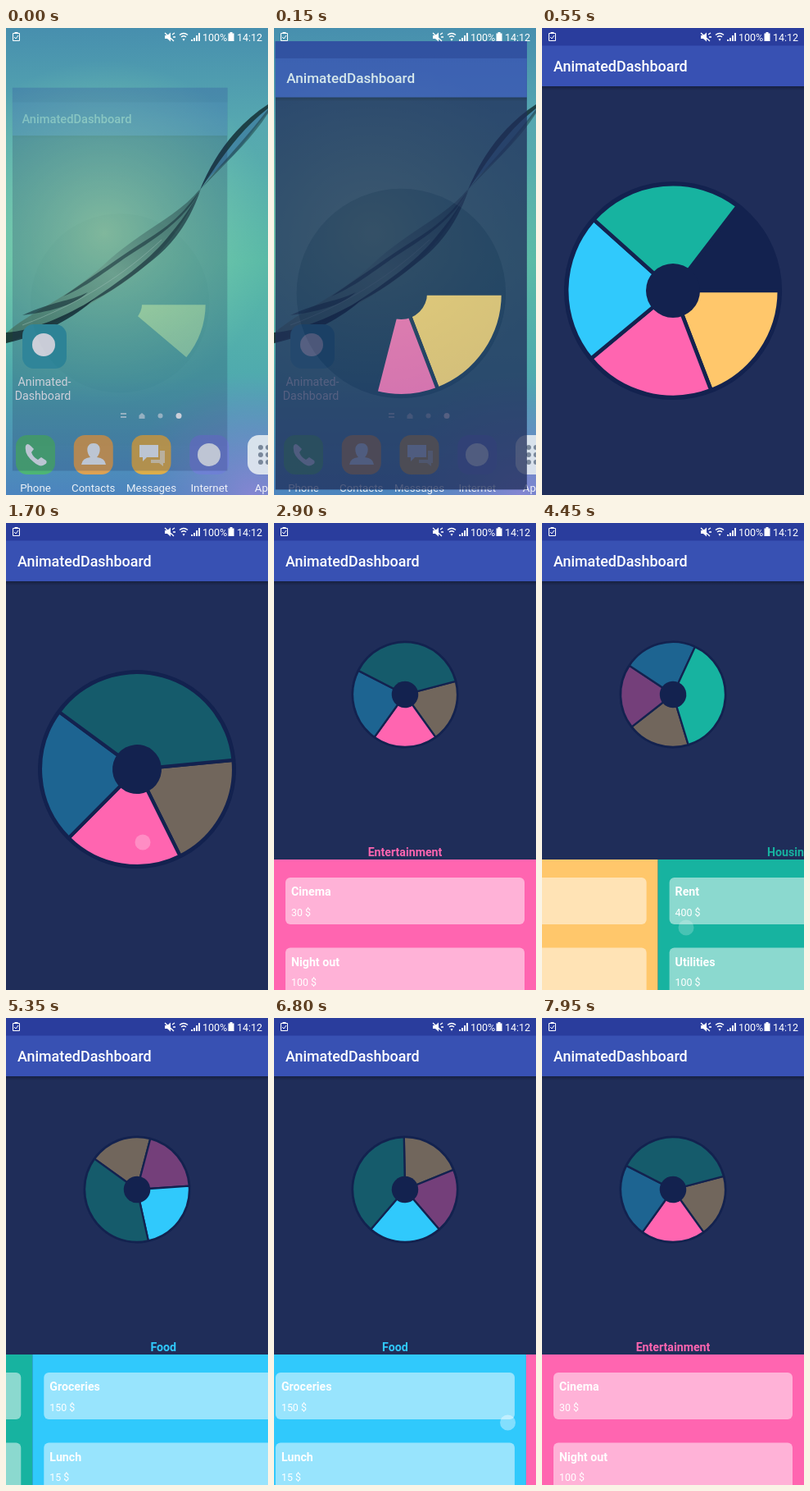
An HTML page that plays this animation: 320 by 569 pixels, repeating every 8000 ms.

```html
<!DOCTYPE html>
<html lang="en">
<head>
<meta charset="utf-8">
<title>AnimatedDashboard</title>
<style>
html, body { margin: 0; width: 100%; height: 100%; overflow: hidden; background: #1f2d59; }
svg { display: block; width: 100vw; height: 100vh; font-family: Roboto, "Noto Sans", sans-serif; fill: #fff; }
.status { font-size: 12.5px; }
.bar { font-size: 17.9px; font-weight: 500; }
.title { font-size: 14.2px; font-weight: 700; text-anchor: middle; }
.item { font-size: 14.2px; font-weight: 700; }
.amount { font-size: 12.4px; }
.app { font-size: 14.2px; text-anchor: middle; }
.dock { font-size: 13.3px; text-anchor: middle; }
</style>
</head>
<body>
<svg viewBox="0 0 320 569">
  <defs>
    <linearGradient id="sky" x1="0" y1="0" x2="0" y2="1">
      <stop offset="0" stop-color="#478fae"/>
      <stop offset=".2" stop-color="#56a7b0"/>
      <stop offset=".5" stop-color="#59b9a6"/>
      <stop offset=".75" stop-color="#4faaae"/>
      <stop offset="1" stop-color="#4c84be"/>
    </linearGradient>
    <radialGradient id="glow" gradientUnits="userSpaceOnUse" cx="120" cy="250" r="210">
      <stop offset="0" stop-color="#a4e6b4" stop-opacity=".95"/>
      <stop offset="1" stop-color="#7fd3b0" stop-opacity="0"/>
    </radialGradient>
    <radialGradient id="dusk" gradientUnits="userSpaceOnUse" cx="300" cy="569" r="150">
      <stop offset="0" stop-color="#8a86d4" stop-opacity=".9"/>
      <stop offset="1" stop-color="#7088c8" stop-opacity="0"/>
    </radialGradient>
    <linearGradient id="shade" x1="0" y1="0" x2="0" y2="1">
      <stop offset="0" stop-opacity=".3"/>
      <stop offset="1" stop-opacity="0"/>
    </linearGradient>
    <linearGradient id="leaf" x1="0" y1="1" x2="1" y2="0">
      <stop offset="0" stop-color="#4a8468"/>
      <stop offset=".5" stop-color="#86c3a0"/>
      <stop offset="1" stop-color="#3d7468"/>
    </linearGradient>
  </defs>

  <g id="home">
    <rect width="320" height="569" fill="url(#sky)"/>
    <rect width="320" height="569" fill="url(#glow)"/>
    <rect width="320" height="569" fill="url(#dusk)"/>
    <path d="M0 372C30 345 75 330 120 288S210 230 237 196C215 245 190 275 155 302S60 362 0 384Z" fill="url(#leaf)" opacity=".9"/>
    <path d="M237 197C250 165 275 122 320 94V103C305 118 290 145 270 162S245 185 237 197Z" fill="#4387a3"/>
    <g fill="#142f30">
      <path d="M70 327C110 300 140 278 175 256S222 218 238 196C220 232 185 255 155 274S105 312 70 327Z" opacity=".55"/>
      <path d="M0 371C30 370 75 350 108 330C85 352 45 374 0 384Z" opacity=".85"/>
      <path d="M20 350C60 332 75 334 100 322C80 340 50 346 20 350Z" opacity=".6"/>
      <path d="M95 338C140 308 172 285 195 258S228 215 238 196C225 235 205 262 180 282S130 322 95 338Z" opacity=".65"/>
      <path d="M237 197C250 165 275 122 320 93V98C285 125 262 160 237 197Z" opacity=".8"/>
      <path d="M237 197C262 166 290 138 320 99V104C295 142 262 170 237 197Z" opacity=".45"/>
    </g>
    <path d="M20 362C90 336 145 300 190 258" fill="none" stroke="#c4ecd4" opacity=".5"/>
    <rect x="20" y="361" width="54" height="54" rx="14" fill="#35a0ac"/>
    <circle cx="46" cy="386" r="14"/>
    <g class="app"><text x="47" y="436">Animated-</text><text x="45" y="453">Dashboard</text></g>
    <g opacity=".6">
      <path d="M140 470h7M140 474h7" stroke="#fff" stroke-width="2"/>
      <path d="M162.500 476v-4l3.500-3 3.500 3v4z"/>
      <circle cx="188.500" cy="472.500" r="3"/>
    </g>
    <circle cx="211" cy="472.500" r="3.500"/>
    <g opacity=".88">
      <g id="dock"></g>
      <path d="M24 509q2-4 6 0l4 4-3 4q2 6 8 9l4-3 6 4q2 3-2 5-5 4-13-3-12-9-10-20z"/>
      <path d="M107 506c10 0 9 12 4 17q10 1 11 9H92q1-8 11-9c-5-5-6-17 4-17z"/>
      <path d="M163 508h23v15h-14l-5 5v-5h-4z"/>
      <path d="M177 526h11v-11h6v15h-2v4l-5-4h-10z" opacity=".6"/>
      <circle cx="248" cy="520" r="14"/>
      <g id="dots" fill="#7b8794"></g>
    </g>
  </g>

  <g id="window">
    <rect width="320" height="569" fill="#1f2d59"/>
    <rect y="71" width="320" height="5" fill="url(#shade)"/>
    <rect width="320" height="71" fill="#3851b3"/>
    <rect width="320" height="21.500" fill="#2a3d9d"/>
    <text class="bar" x="14" y="53">AnimatedDashboard</text>
    <g id="pie" stroke="#13224f" stroke-width="3.700">
      <circle r="104.800" fill="#13224f" stroke="none"/>
      <g id="wedges"></g>
      <circle r="26" fill="#13224f" stroke="none"/>
    </g>
    <g id="pages"></g>
    <circle id="touch" r="9.500"/>
  </g>

  <g class="status">
    <g fill="none" stroke="#fff">
      <path d="M8.500 6.500h8v9h-8zM10.500 5.500h4M10 11l2 2 3-4"/>
      <path d="M194 6l11 10M203 8l3-2M204 11h3" stroke-width="1.300"/>
      <path d="M212 8.500q5-4 10 0M214 11q3-2.500 6 0" stroke-width="1.500"/>
    </g>
    <path d="M194 9h3l4-3.500v11L197 13h-3zM215.500 13h3l-1.500 3z"/>
    <path d="M226 14h2v2h-2zM229 12h2v4h-2zM232 9h2v7h-2zM235 6h2v10h-2z"/>
    <path d="M273.500 5h3v1.500h2V16h-7V6.500h2z"/>
    <text x="240" y="15.500">100%</text>
    <text x="282" y="15.500">14:12</text>
  </g>
</svg>
<script>
const LOOP = 8000, WIDTH = 320;
const $ = id => document.getElementById(id);

const pink = { name: 'Entertainment', color: '#ff65b0', dim: '#743f7a', from: 69, to: 140.4,
  items: [['Cinema', '30 $'], ['Night out', '100 $']] };
const yellow = { name: 'Trips', color: '#ffc76b', dim: '#71665c', from: 0, to: 69,
  items: [['Train', '20 $'], ['Taxi', '30 $']] };
const blue = { name: 'Food', color: '#30c9fc', dim: '#1d6491', from: 140.4, to: 221.8,
  items: [['Groceries', '150 $'], ['Lunch', '15 $']] };
const green = { name: 'Housing', color: '#17b3a0', dim: '#155b6b', from: 221.8, to: 360,
  items: [['Rent', '400 $'], ['Utilities', '100 $']] };
const slices = [yellow, pink, blue, green];
const pages = [pink, yellow, green, blue, pink];

// Each swipe: release time and how far the page was dragged by then.
const swipes = [[3500, .38], [4316, .345], [5096, .41], [7000, .38]];
const TAP = 1492, DRAG = 250;

const clamp = x => Math.max(0, Math.min(1, x));
const ramp = (t, start, length) => clamp((t - start) / length);
const ease = x => (1 - Math.cos(Math.PI * x)) / 2;
const mix = (a, b, k) => a + (b - a) * k;

function add(parent, tag, attrs, text = '') {
  const el = document.createElementNS('http://www.w3.org/2000/svg', tag);
  for (const key in attrs) el.setAttribute(key, attrs[key]);
  el.textContent = text;
  parent.append(el);
  return el;
}

function sector(from, to, r = 102.3) {
  const at = deg => {
    const a = deg * Math.PI / 180;
    return `${r * Math.cos(a)} ${r * Math.sin(a)}`;
  };
  return `M0 0L${at(from)}A${r} ${r} 0 ${to - from > 180 ? 1 : 0} 1 ${at(to)}Z`;
}

[['Phone', '#4dbb6c'], ['Contacts', '#f0a545'], ['Messages', '#efb23c'],
 ['Internet', '#6f80d6'], ['Apps', '#e8eef2']].forEach(([label, fill], i) => {
  const x = 36 + i * 70.75;
  add($('dock'), 'rect', { x: x - 24, y: 496, width: 48, height: 48, rx: 14, fill });
  add($('dock'), 'text', { class: 'dock', x, y: 565 }, label);
});
for (let i = 0; i < 9; i++)
  add($('dots'), 'circle', { cx: 311 + i % 3 * 9, cy: 511 + Math.floor(i / 3) * 9, r: 3 });

const wedges = slices.map(() => add($('wedges'), 'path', {}));

const pageNodes = pages.map(page => {
  const g = add($('pages'), 'g', {});
  add(g, 'text', { class: 'title', x: 160, y: 406, fill: page.color }, page.name);
  add(g, 'rect', { y: 410, width: WIDTH, height: 160, fill: page.color });
  page.items.forEach(([name, amount], i) => {
    const y = 432 + i * 85.5;
    add(g, 'rect', { x: 14, y, width: 292, height: 57, rx: 6, 'fill-opacity': .5 });
    add(g, 'text', { class: 'item', x: 21, y: y + 22 }, name);
    add(g, 'text', { class: 'amount', x: 21, y: y + 46.5 }, amount);
  });
  return g;
});

const centred = slice => 90 - (slice.from + slice.to) / 2;

function drawWindow(t) {
  const open = ramp(t, 0, 220);
  const scale = mix(.82, 1, ease(open));
  $('home').style.display = open < 1 ? '' : 'none';
  $('window').setAttribute('opacity', mix(.22, 1, open));
  $('window').setAttribute('transform', `translate(44 405) scale(${scale}) translate(-44 -405)`);
}

function drawPie(t) {
  const sweep = 360 * ease(ramp(t, -222, 1030));
  const shrink = ease(ramp(t, TAP, 750));
  let turn = centred(pink) * ease(ramp(t, TAP, 500));
  swipes.forEach(([release], i) => {
    const step = (centred(pages[i + 1]) - centred(pages[i]) + 360) % 360;
    turn += step * ease(ramp(t, release, 500));
  });
  const selected = t < TAP ? null : pages[swipes.filter(([release]) => t >= release).length];
  $('pie').setAttribute('transform',
    `translate(160 ${mix(320, 209, shrink)}) scale(${mix(1.27, .625, shrink)}) rotate(${turn})`);
  slices.forEach((slice, i) => {
    const end = Math.min(slice.to, sweep);
    wedges[i].setAttribute('d', end > slice.from ? sector(slice.from, end) : '');
    wedges[i].setAttribute('fill', !selected || selected === slice ? slice.color : slice.dim);
  });
}

function drawPages(t) {
  const drop = 185 * (1 - ease(ramp(t, 2000, 400)));
  const position = swipes.reduce((sum, [release, pulled]) => sum
    + pulled * ease(ramp(t, release - DRAG, DRAG))
    + (1 - pulled) * ease(ramp(t, release, 350)), 0);
  pageNodes.forEach((node, i) => {
    const x = (i - position) * WIDTH;
    node.style.display = Math.abs(x) < WIDTH && t > 2000 ? '' : 'none';
    node.setAttribute('transform', `translate(${x} ${drop})`);
  });
}

function drawTouch(t) {
  let x = 167, y = 389;
  let alpha = ramp(t, 1400, 40) * (1 - ramp(t, 1650, 150));
  for (const [release, pulled] of swipes) {
    if (t < release - DRAG - 50 || t > release + 220) continue;
    x = 176 + pulled * WIDTH * (1 - ease(ramp(t, release - DRAG, DRAG)));
    y = 493;
    alpha = ramp(t, release - DRAG - 50, 50) * (1 - ramp(t, release + 60, 160));
  }
  const touch = $('touch');
  touch.setAttribute('cx', x);
  touch.setAttribute('cy', y);
  touch.setAttribute('opacity', alpha * .4);
}

function frame() {
  const t = performance.now() % LOOP;
  drawWindow(t);
  drawPie(t);
  drawPages(t);
  drawTouch(t);
  requestAnimationFrame(frame);
}
frame();
</script>
</body>
</html>
```
